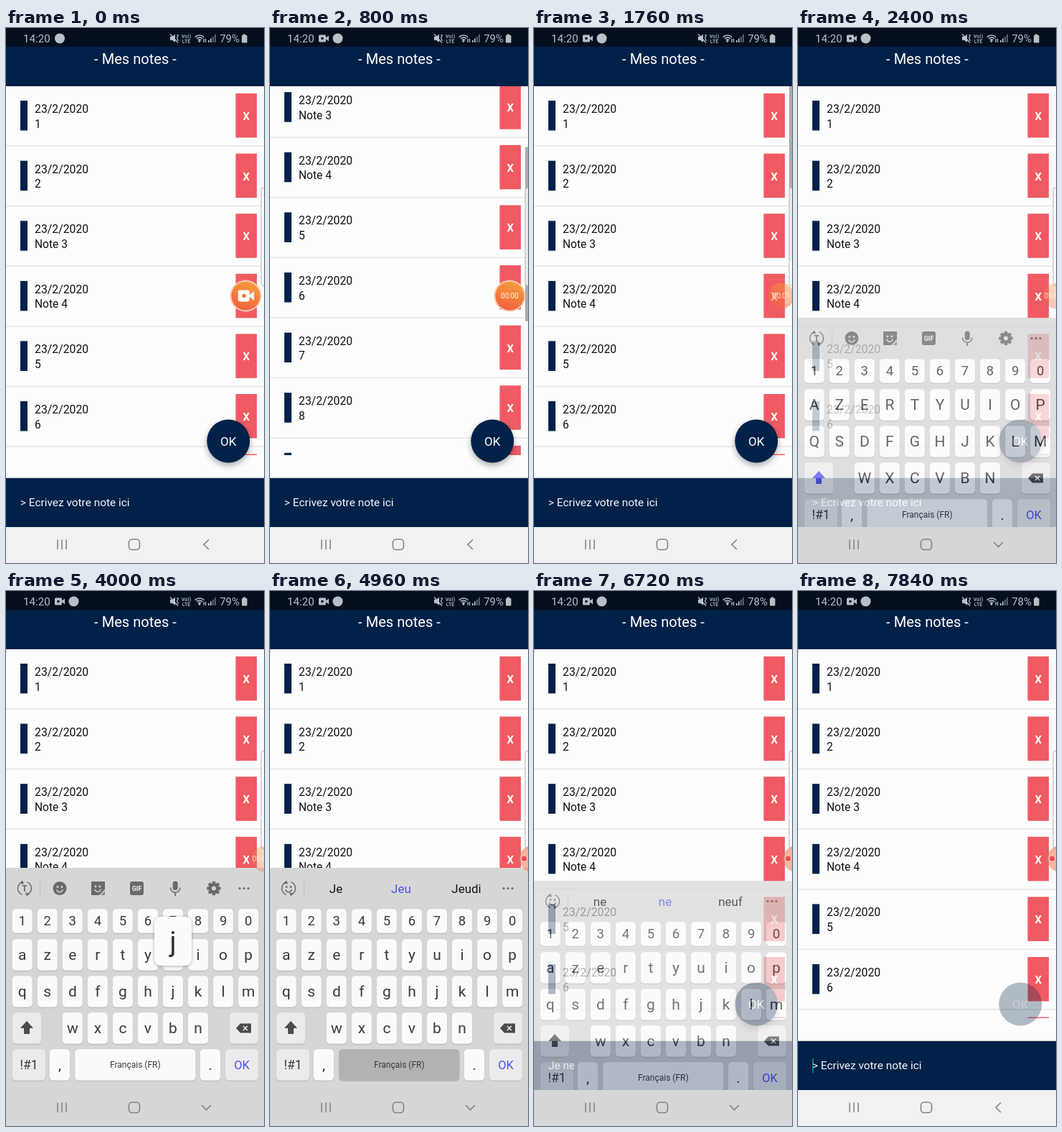
Recreate the animation shown at these times as an HTML page with a canvas. Size 360 px wide and 744 px high, loop 8 s.

```html
<!DOCTYPE html>
<html lang="fr">
<head>
<meta charset="utf-8">
<title>Mes notes</title>
<style>
html, body { margin: 0; width: 100%; height: 100%; overflow: hidden; background: #fdfdfd; }
canvas { display: block; width: 360px; height: 744px; }
</style>
</head>
<body>
<canvas id="stage"></canvas>
<script>
const W = 360, H = 744, LOOP = 8000, STEP = 160;
const NAVY = '#022148', RED = '#f05a62', KEYS_BG = '#d6d6d6', GREY = '#6a6a6a', BLUE = '#4d55ee';
const LIST_TOP = 81, LIST_END = 594, ROW = 83.6, COUNT = 13;
const MAX_SCROLL = COUNT * ROW - (LIST_END - LIST_TOP);
const ratio = window.devicePixelRatio || 1;

function setup(canvas) {
  canvas.width = W * ratio;
  canvas.height = H * ratio;
  const ctx = canvas.getContext('2d');
  ctx.scale(ratio, ratio);
  return ctx;
}
const screen = setup(document.getElementById('stage'));
const keysCanvas = document.createElement('canvas');
const keysCtx = setup(keysCanvas);
let g = screen;

// Drawing helpers
function rect(x, y, w, h, color) {
  g.fillStyle = color;
  g.fillRect(x, y, w, h);
}
function round(x, y, w, h, r, color) {
  g.beginPath();
  g.roundRect(x, y, w, h, r);
  g.fillStyle = color;
  g.fill();
}
function disc(x, y, r, color) {
  g.beginPath();
  g.arc(x, y, r, 0, 7);
  g.fillStyle = color;
  g.fill();
}
function arc(x, y, r, from, to, color, width) {
  g.beginPath();
  g.arc(x, y, r, from, to);
  g.strokeStyle = color;
  g.lineWidth = width;
  g.stroke();
}
function trace(points) {
  g.beginPath();
  points.forEach(([x, y]) => g.lineTo(x, y));
}
function shape(points, color) {
  trace(points);
  g.fillStyle = color;
  g.fill();
}
function line(points, color, width) {
  trace(points);
  g.strokeStyle = color;
  g.lineWidth = width;
  g.stroke();
}
function text(str, x, y, size, color, align = 'left', weight = 400) {
  g.font = `${weight} ${size}px Roboto, sans-serif`;
  g.textAlign = align;
  g.fillStyle = color;
  g.fillText(str, x, y);
}
function shadow(color, blur = 0, dy = 0) {
  g.shadowColor = color;
  g.shadowBlur = blur * ratio;
  g.shadowOffsetY = dy * ratio;
}
function noShadow() { shadow('transparent'); }
function along(stops, t) {
  let [t0, v0] = stops[0];
  for (const [t1, v1] of stops) {
    if (t < t1) return t <= t0 ? v0 : v0 + (v1 - v0) * (t - t0) / (t1 - t0);
    [t0, v0] = [t1, v1];
  }
  return v0;
}

// Timeline
const SCROLL = [[320, 0], [480, 30], [640, 90], [800, 179], [960, 390], [1120, MAX_SCROLL],
  [1280, MAX_SCROLL], [1440, 340], [1600, 90], [1700, 0]];
const PRESSES = [[3840, 'j'], [4480, 'e'], [4960, ' '], [5440, 'n'], [5920, 'e'], [6560, 'OK']];
const HINTS = [[4160, 'J', 'Je', 'J’ai'], [4640, 'Je', 'Jeu', 'Jeudi'], [5120, 'suis', 'ne', 'vais'],
  [5600, 'n', 'non', 'nous'], [6240, 'ne', 'ne', 'neuf']];

function drawCamera(x, y, k, color) {
  round(x - 7 * k, y - 5 * k, 10 * k, 10 * k, 1.5 * k, color);
  shape([[x + 2 * k, y], [x + 7 * k, y - 4 * k], [x + 7 * k, y + 4 * k]], color);
}

function drawStatus(t) {
  const c = '#b8bfc7';
  rect(0, 0, W, 26, '#050f1e');
  text('14:20', 24, 20, 15.2, c);
  const recording = t >= 320;
  if (recording) {
    drawCamera(75, 14.5, 1, c);
    disc(75 - 2, 14.5, 1.8, '#050f1e');
  }
  disc(recording ? 94.5 : 75, 14.5, 7, c);
  shape([[229, 12], [232, 12], [236, 8.5], [236, 20], [232, 17], [229, 17]], c);
  line([[229, 8.5], [240, 20.5]], c, 1.4);
  line([[238, 10], [240.5, 10], [238.5, 14], [240.5, 18]], c, 1.2);
  text('Vo))', 251.5, 13.5, 7, c, 'center', 500);
  text('LTE', 251.5, 20.5, 7, c, 'center', 500);
  [3, 6, 9].forEach(r => arc(270, 19, r, -2.35, -0.79, c, 1.5));
  disc(270, 18.5, 1.4, c);
  line([[276, 15], [276, 20]], c, 1.3);
  line([[278.5, 15], [278.5, 20]], c, 1.3);
  [3, 5.5, 8, 11].forEach((h, i) => rect(282 + i * 3, 20 - h, 1.7, h, i < 2 ? c : '#66707b'));
  text(t < 6720 ? '79%' : '78%', 326, 20, 15, c, 'right');
  rect(331, 8.5, 3, 2, c);
  round(329, 10, 7.5, 10.5, 1, c);
}

function drawRow(i, y) {
  rect(20, y + 20, 10, 41.5, NAVY);
  text('23/2/2020', 40, y + 37, 15.8, '#111');
  const n = i + 1;
  text(n === 3 || n === 4 ? 'Note ' + n : String(n), 40, y + 57.5, 15.6, '#111');
  rect(320.5, y + 10, 29.5, 61.5, RED);
  text('X', 335.3, y + 47, 15, '#fff', 'center', 700);
  rect(0, y + 82, W, 1.8, '#e9e9e9');
}

function drawList(t) {
  const offset = along(SCROLL, t), view = LIST_END - LIST_TOP;
  g.save();
  g.beginPath();
  g.rect(0, LIST_TOP, W, view);
  g.clip();
  for (let i = 0; i < COUNT; i++) drawRow(i, LIST_TOP + i * ROW - offset);
  if (t >= 480 && t < 2240) {
    const k = view / (COUNT * ROW);
    g.globalAlpha = along([[1920, 1], [2240, 0]], t);
    rect(356, LIST_TOP + offset * k, 4, view * k, '#adadad');
  }
  g.restore();
}

function drawFooter(t) {
  rect(0, 624.5, W, 1.5, '#dedede');
  rect(0, 626, W, 68, NAVY);
  const typed = t >= 6560 && t < 7840;
  text(typed ? 'Je ne' : '> Ecrivez votre note ici', 20, 665.3, 15.4, '#f4f6f8');
  if (t >= 7040 && (t < 7520 || t >= 7840)) rect(typed ? 58 : 20, 650, 1.5, 20, '#159a8c');
}

function drawButton(t) {
  const pressed = t >= 7840;
  g.globalAlpha = pressed ? 0.3 : 1;
  if (!pressed) shadow('rgba(0,0,0,.32)', 8, 4);
  disc(310.3, 574.5, 30, NAVY);
  noShadow();
  text('OK', 310.3, 581, 17, '#fff', 'center');
  g.globalAlpha = 1;
}

function drawNav(typing) {
  const c = '#828282';
  rect(0, 694, W, 50, typing ? KEYS_BG : '#f1f1f1');
  [72, 78, 84].forEach(x => rect(x - 0.7, 711.5, 1.5, 13.5, c));
  g.beginPath();
  g.roundRect(171.5, 711, 15, 14.5, 4.5);
  g.strokeStyle = c;
  g.lineWidth = 1.6;
  g.stroke();
  line(typing ? [[273, 715], [279.5, 721.5], [286, 715]] : [[283, 711.5], [276, 718.3], [283, 725]], c, 1.6);
}

// Keyboard
const col = i => 22.7 + i * 35.05;
const KEYS = [];
function addRow(chars, y, h, first = 0) {
  [...chars].forEach((ch, i) => KEYS.push({ ch, x: col(i + first), y, w: 28, h, size: h < 40 ? 18.5 : 21 }));
}
addRow('1234567890', 459, 33.5);
addRow('azertyuiop', 506, 43.5);
addRow('qsdfghjklm', 557, 43.5);
addRow('wxcvbn', 608, 43.5, 2);
function addKey(ch, x, y, w, size, dim) { KEYS.push({ ch, x, y, w, h: 43.5, size, dim }); }
addKey('shift', 29, 608, 40, 0, true);
addKey('erase', 332, 608, 40, 0, true);
addKey('!#1', 32, 659, 46, 17.5, true);
addKey(',', 75, 659, 28, 21);
addKey(' ', 180.3, 659, 168, 12);
addKey('.', 285, 659, 28, 21);
addKey('OK', 329, 659, 46, 16.5, true);

function drawCycle(x, y) {
  arc(x, y, 9.5, -1.2, 1.1, GREY, 1.5);
  arc(x, y, 9.5, 1.95, 4.25, GREY, 1.5);
  shape([[x + 1, y + 6], [x + 7, y + 7], [x + 3, y + 11]], GREY);
  shape([[x - 1, y - 6], [x - 7, y - 7], [x - 3, y - 11]], GREY);
}
function drawSmile(x, y, color) {
  disc(x - 3, y - 2, 1.4, color);
  disc(x + 3, y - 2, 1.4, color);
  arc(x, y + 0.5, 4.6, 0.3, 2.84, color, 1.6);
}

function drawToolbar(t) {
  const y = 413.5;
  drawCycle(26, y);
  rect(47, 404, 1, 20, '#bcbcbc');
  [326, 332, 338].forEach(x => disc(x, y, 1.6, GREY));
  const hint = HINTS.filter(h => t >= h[0]).pop();
  if (hint) {
    drawSmile(26, y, GREY);
    [92, 183, 274].forEach((x, i) => text(hint[i + 1], x, 420, 17, i === 1 ? BLUE : '#161616', 'center'));
    return;
  }
  text('T', 26, y + 4.5, 12, GREY, 'center', 700);
  disc(75, y, 9.5, GREY);
  drawSmile(75, y, KEYS_BG);
  shape([[119, 404], [138, 404], [138, 415], [130, 423], [119, 423]], GREY);
  shape([[132, 423], [138, 417], [138, 423]], '#8d8d8d');
  drawSmile(128, y - 0.5, KEYS_BG);
  round(173, 404, 19, 19, 3, GREY);
  text('GIF', 182.5, y + 3.3, 9, '#f0f0f0', 'center', 700);
  round(232.7, 403.5, 7, 12.5, 3.5, GREY);
  arc(236.2, 412.5, 6.8, 0, Math.PI, GREY, 1.6);
  rect(235.3, 419, 1.8, 5, GREY);
  for (let i = 0; i < 8; i++) {
    const a = i * Math.PI / 4, c = Math.cos(a), s = Math.sin(a);
    line([[290 + c * 5, y + s * 5], [290 + c * 9.6, y + s * 9.6]], GREY, 4.4);
  }
  disc(290, y, 7.4, GREY);
  disc(290, y, 3, KEYS_BG);
}

function drawKeyFace(key, upper) {
  const { ch, x, y } = key, ink = '#3a3a3a';
  if (ch === 'shift') {
    shape([[x, y - 10], [x + 9, y], [x + 4, y], [x + 4, y + 8], [x - 4, y + 8], [x - 4, y], [x - 9, y]],
      upper ? '#5a58f2' : '#4a4a4a');
  } else if (ch === 'erase') {
    shape([[x - 11, y], [x - 5, y - 6.5], [x + 10, y - 6.5], [x + 10, y + 6.5], [x - 5, y + 6.5]], '#4a4a4a');
    line([[x - 1, y - 3], [x + 5, y + 3]], '#eee', 1.6);
    line([[x + 5, y - 3], [x - 1, y + 3]], '#eee', 1.6);
  } else if (ch === ' ') {
    text('Français (FR)', x, y + 4, key.size, ink, 'center');
  } else if (ch === 'OK') {
    text(ch, x, y + 5.8, key.size, BLUE, 'center');
  } else {
    text(upper ? ch.toUpperCase() : ch, x, y + key.size * 0.35, key.size, ink, 'center');
  }
}

function drawKeyboard(t) {
  const upper = t < 4000;
  rect(0, 385, W, 309, KEYS_BG);
  drawToolbar(t);
  const press = PRESSES.find(([at]) => t >= at && t < at + 2 * STEP);
  const active = press && KEYS.find(k => k.ch === press[1]);
  for (const key of KEYS) {
    const { x, y, w, h } = key;
    const held = key === active && t < press[0] + STEP;
    shadow('rgba(0,0,0,.16)', 1, 1);
    round(x - w / 2, y - h / 2, w, h, 5, held ? '#b2b2b2' : key.dim ? '#ebebeb' : '#fafafa');
    noShadow();
    drawKeyFace(key, upper);
  }
  if (active && active.w === 28) {
    const { ch, x, y } = active;
    shadow('rgba(0,0,0,.3)', 4, 1);
    round(x - 26, y - 104, 52, 68, 9, '#fbfbfb');
    noShadow();
    text(upper ? ch.toUpperCase() : ch, x, y - 56, 38, '#2c2c2c', 'center');
  }
}

function drawBubble(t) {
  const sec = Math.max(0, Math.floor((t - 400) / 1000));
  const docked = t >= 4800;
  const x = docked ? 367 : along([[1280, 334.5], [1760, 345], [2240, 361]], t);
  const r = docked ? 19 : along([[1280, 20], [1760, 18]], t);
  const alpha = docked ? 0.62 : along([[1280, 1], [1760, 0.5], [2240, 0.35]], t);
  g.globalAlpha = alpha;
  if (t <= 1280) disc(x, 372.5, r + 2, '#f8cdb8');
  const fill = g.createLinearGradient(x + 8, 353, x - 6, 392);
  fill.addColorStop(0, '#f7a03c');
  fill.addColorStop(0.5, '#f5803c');
  fill.addColorStop(1, '#f2603c');
  disc(x, 372.5, r, docked ? '#f5876a' : fill);
  g.globalAlpha = 1;
  if (docked) {
    disc(354.5, 372, 5.2, '#f9c4b6');
    disc(354.5, 372, 3.6, '#ea4f55');
  } else if (t < 320) {
    drawCamera(x + 0.5, 372.5, 1.6, '#fff');
    disc(x - 2.5, 372.5, 2.8, '#f47a3c');
  } else {
    g.globalAlpha = along([[1280, 1], [1760, 0.85]], t);
    text('00:0' + sec, Math.min(x, 356), 376, 10, '#fff6ea', 'center');
    g.globalAlpha = 1;
  }
}

function drawHandle() {
  g.beginPath();
  g.roundRect(356, 222, 12, 136.5, 4);
  g.fillStyle = 'rgba(250,250,250,.8)';
  g.fill();
  g.strokeStyle = '#b4b4b4';
  g.lineWidth = 1;
  g.stroke();
}

function draw(t) {
  const alpha = along([[2240, 0], [2400, 0.78], [2560, 1], [6560, 1], [6720, 0.7], [6880, 0]], t);
  g = keysCtx;
  if (alpha > 0) drawKeyboard(t);
  g = screen;
  rect(0, 0, W, H, '#fdfdfd');
  drawList(t);
  rect(0, 26, W, 55, NAVY);
  text('- Mes notes -', 180.5, 49.5, 20.1, '#fff', 'center');
  drawStatus(t);
  drawFooter(t);
  drawButton(t);
  drawNav(alpha > 0);
  if (alpha > 0) {
    g.globalAlpha = alpha;
    // only the keyboard part of the layer is copied
    g.drawImage(keysCanvas, 0, 385 * ratio, W * ratio, 309 * ratio, 0, alpha < 1 ? 403 : 385, W, 309);
    g.globalAlpha = 1;
    if (alpha < 1) drawNav(true);
  }
  drawHandle();
  drawBubble(t);
}

const start = performance.now();
function tick() {
  const t = (performance.now() - start) % LOOP;
  draw(Math.floor(t / STEP) * STEP);
  requestAnimationFrame(tick);
}
tick();
</script>
</body>
</html>
```
